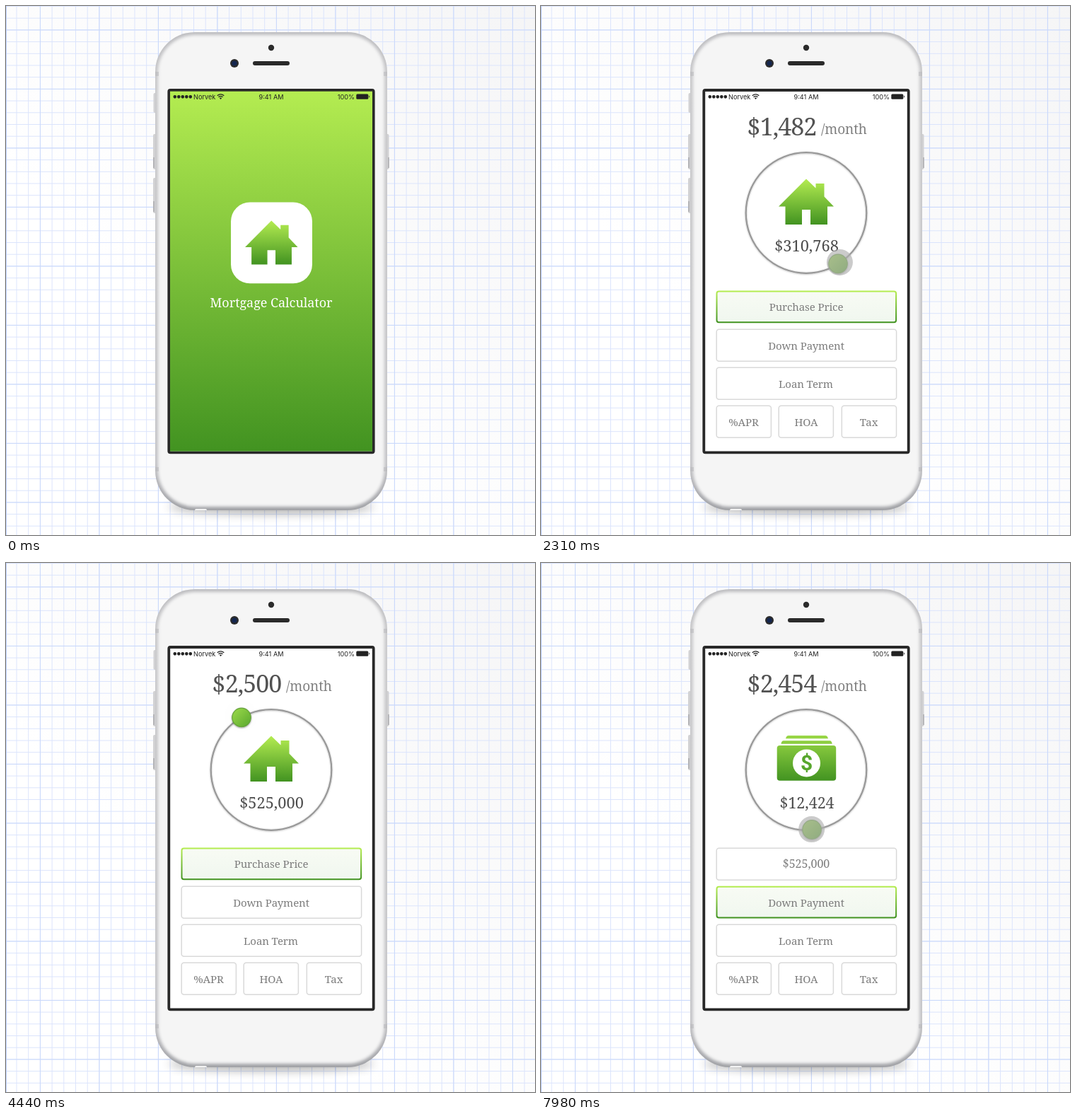
Animation, 748 px wide and 748 px high, one loop 8 s. Source, as an HTML page:

```html
<!DOCTYPE html>
<html lang="en">
<head>
<meta charset="utf-8">
<title>Mortgage Calculator</title>
<style>
  html, body { margin: 0; width: 100%; height: 100%; overflow: hidden; background: #fff; }
  svg { display: block; width: 100vw; height: 100vh; }
  .slab { font-family: "Noto Serif", serif; font-weight: 300; }
  .mid { text-anchor: middle; }
  .label { font-size: 15px; letter-spacing: -.1px; fill: #7c7c7c; }
  .price { font-size: 16px; letter-spacing: 0; }
  .status { font: 9.2px Inter, Roboto, sans-serif; fill: #222; }
  .box { fill: #fff; stroke: #d9d9d9; stroke-width: 1.5; }
  .active { fill: url(#tint); stroke: url(#green); stroke-width: 2; }
</style>
</head>
<body>
<svg viewBox="0 0 748 748" xmlns="http://www.w3.org/2000/svg">
  <defs>
    <linearGradient id="green" x2="0" y2="1">
      <stop stop-color="#b4ec51"/><stop offset="1" stop-color="#429321"/>
    </linearGradient>
    <linearGradient id="cash" gradientUnits="userSpaceOnUse" x1="0" y1="238" x2="0" y2="308">
      <stop stop-color="#a2de49"/><stop offset="1" stop-color="#429321"/>
    </linearGradient>
    <linearGradient id="tint" x2="0" y2="1">
      <stop stop-color="#f8fbf4"/><stop offset="1" stop-color="#f0f7ef"/>
    </linearGradient>
    <linearGradient id="ball" x2="1" y2="1">
      <stop stop-color="#9cdb47"/><stop offset="1" stop-color="#56a72b"/>
    </linearGradient>
    <linearGradient id="paper" x1="0" y1="1" x2="1" y2="0">
      <stop offset=".35" stop-color="#fff"/><stop offset="1" stop-color="#f5f5f6"/>
    </linearGradient>
    <linearGradient id="metal" x2="0" y2="1">
      <stop stop-color="#bcbcbf"/><stop offset=".1" stop-color="#c8c8ca"/>
      <stop offset=".9" stop-color="#c3c3c6"/><stop offset="1" stop-color="#9fa0a4"/>
    </linearGradient>
    <pattern id="minor" width="16.7" height="16.7" x="14.5" patternUnits="userSpaceOnUse">
      <path d="M.5 0V16.7M0 .5H16.7" stroke="#dbe4fc"/>
    </pattern>
    <pattern id="major" width="83.5" height="83.5" x="47.9" y="33.4" patternUnits="userSpaceOnUse">
      <path d="M.5 0V83.5M0 .5H83.5" stroke="#c9d8fb"/>
    </pattern>
    <filter id="soft" x="-10%" y="-10%" width="120%" height="120%"><feGaussianBlur stdDeviation="2"/></filter>
    <filter id="blur" x="-20%" y="-200%" width="140%" height="500%"><feGaussianBlur stdDeviation="7"/></filter>
    <filter id="drop" x="-30%" y="-30%" width="160%" height="160%">
      <feDropShadow dx="0" dy="1" stdDeviation="1.3" flood-opacity=".42"/>
    </filter>
    <filter id="halo" x="-5%" y="-5%" width="110%" height="110%">
      <feDropShadow dx="0" dy=".5" stdDeviation=".9" flood-opacity=".3"/>
    </filter>
    <clipPath id="body"><rect x="211" y="37" width="328" height="676" rx="56"/></clipPath>
    <path id="house" d="M375 244.5L388.5 257.5V251H400.5V269.5L414 283.5H405V309H381V288H369V309H345.5V283.5H336Z" fill="url(#green)"/>
  </defs>

  <!-- backdrop -->
  <rect width="748" height="748" fill="url(#paper)"/>
  <rect width="748" height="748" fill="url(#minor)"/>
  <rect width="748" height="748" fill="url(#major)"/>
  <path d="M.5 0V748" stroke="#bccffa"/>

  <!-- phone -->
  <ellipse cx="375" cy="708" rx="145" ry="10" opacity=".3" filter="url(#blur)"/>
  <g fill="#d2d2d4">
    <rect x="208.5" y="123" width="5" height="28" rx="2"/>
    <rect x="208" y="181" width="5" height="50" rx="2"/>
    <rect x="208" y="243" width="5" height="50" rx="2"/>
    <rect x="537" y="181" width="4.5" height="50" rx="2"/>
  </g>
  <path d="M209 214V229M209 276V291M541 214V229" stroke="#a0a0a3" stroke-width="1.2"/>
  <g clip-path="url(#body)">
    <rect x="211" y="37" width="328" height="676" fill="url(#metal)"/>
    <rect x="215" y="41" width="320" height="667" rx="52" fill="#f5f5f5" filter="url(#soft)"/>
    <path d="M211 96H216M534 96H539M211 655H216M534 655H539" stroke="#b9b9bc" stroke-width="6" opacity=".55"/>
    <rect x="267" y="711" width="17" height="4" rx="2" fill="#f3f3f3"/>
  </g>
  <circle cx="375" cy="59" r="4.2" fill="#2b2b2b"/>
  <circle cx="323" cy="81" r="6" fill="#2b2b2b"/>
  <circle cx="323" cy="81" r="3.6" fill="#14264f"/>
  <rect x="349" y="78" width="52" height="6" rx="3" fill="#2a2a2a"/>
  <rect x="230.3" y="119" width="289.4" height="512.3" rx="2" fill="#fff" stroke="#282828" stroke-width="3.8"/>

  <!-- calculator -->
  <g id="ui" class="slab">
    <text id="monthly" class="mid" x="340.5" y="183" font-size="34" letter-spacing="-.95" fill="#525252"></text>
    <text x="396" y="181" font-size="19" letter-spacing="-.1" fill="#808080">/month</text>

    <circle cx="375" cy="292.5" r="85.3" fill="none" stroke="#989898" stroke-width="2.2" filter="url(#halo)"/>

    <g id="homeView">
      <use href="#house"/>
      <text id="price" class="mid" x="375.5" y="347" font-size="21.8" fill="#4c4c4c"></text>
      <rect class="active" x="248.5" y="403.4" width="253.6" height="43.8" rx="3"/>
      <text class="mid label" x="375" y="430.5">Purchase Price</text>
      <rect class="box" x="248.2" y="457.2" width="254.4" height="45" rx="3.5"/>
    </g>

    <g id="cashView">
      <path fill="url(#cash)" d="M346 248.3Q347 244 350 244H402Q405 244 406 248.3ZM339.5 255.8Q340 251.2 343 251.2H408.5Q411 251.2 411.7 255.8Z"/>
      <rect x="333.7" y="258" width="83.5" height="49.7" rx="4" fill="url(#cash)"/>
      <circle cx="375.5" cy="283" r="19.5" fill="#fff"/>
      <text class="mid" x="375.5" y="293.3" font-size="30" fill="#57a62c" style="font-family:Roboto,sans-serif;font-weight:700">$</text>
      <rect class="box" x="248.2" y="403.2" width="254.4" height="45" rx="3.5"/>
      <text class="mid label price" x="375" y="431.3">$525,000</text>
      <rect class="active" x="248.5" y="457.7" width="253.6" height="43.8" rx="3"/>
    </g>
    <text id="down" class="mid" x="376" y="347" font-size="21.4" fill="#4c4c4c"></text>

    <g class="mid label">
      <rect class="box" x="248.2" y="511.3" width="254.4" height="45" rx="3.5"/>
      <rect class="box" x="248.2" y="565.3" width="77.2" height="45" rx="3.5"/>
      <rect class="box" x="336.2" y="565.3" width="77.2" height="45" rx="3.5"/>
      <rect class="box" x="425.3" y="565.3" width="77.2" height="45" rx="3.5"/>
      <text x="375" y="485.5">Down Payment</text>
      <text x="374.5" y="540">Loan Term</text>
      <text x="286.5" y="594.3">%APR</text>
      <text x="375" y="594.3">HOA</text>
      <text x="463.5" y="594.3">Tax</text>
    </g>

    <circle id="knob" r="13.2" fill="url(#ball)" stroke="#62a136" stroke-width="1.2" filter="url(#drop)"/>
    <circle id="touch" fill="#afafaf"/>
  </g>

  <!-- splash -->
  <g id="splash">
    <rect x="232" y="120.7" width="286" height="508.9" fill="url(#green)"/>
    <rect x="318" y="277.5" width="115" height="114.8" rx="27" fill="#fff"/>
    <use href="#house" transform="translate(375.3 303.5) scale(.955 .96) translate(-375 -244.5)"/>
    <text class="slab mid" x="375" y="426.3" font-size="18" letter-spacing="-.05" fill="#fff" style="font-weight:400">Mortgage Calculator</text>
  </g>

  <!-- status bar -->
  <g class="status">
    <path d="M238.8 128.3H262" stroke="#222" stroke-width="4.7" stroke-linecap="round" stroke-dasharray="0 5.5"/>
    <text x="265" y="132">Norvek</text>
    <path d="M298.7 126.8Q303.5 122.8 308.3 126.8M300.5 128.8Q303.5 126.3 306.5 128.8" fill="none" stroke="#222" stroke-width="1.3"/>
    <path d="M301.9 130.2Q303.5 129 305.1 130.2L303.5 132Z"/>
    <text class="mid" x="375" y="132">9:41 AM</text>
    <text x="493" y="132" text-anchor="end">100%</text>
    <rect x="495.3" y="124.5" width="17" height="7.3" rx="1.5"/>
    <path d="M513.2 126.5Q515.2 128 513.2 129.8Z"/>
  </g>
</svg>

<script>
const LOOP = 8000;
const $ = id => document.getElementById(id);
const [ui, splash, homeView, cashView, monthly, price, down, knob, touch] =
  ['ui', 'splash', 'homeView', 'cashView', 'monthly', 'price', 'down', 'knob', 'touch'].map($);

const ramp = (t, a, b) => Math.min(1, Math.max(0, (t - a) / (b - a)));
const inOut = p => p < .5 ? 2 * p * p : 1 - 2 * (1 - p) ** 2;
const out = p => 1 - (1 - p) ** 2;
const tween = (t, a, b) => inOut(ramp(t, a, b));
const money = v => '$' + Math.round(v).toLocaleString('en-US');

// Degrees run counter-clockwise from the bottom of the ring.
function place(el, deg, cx, cy, r) {
  const a = deg * Math.PI / 180;
  el.setAttribute('cx', cx + r * Math.sin(a));
  el.setAttribute('cy', cy + r * Math.cos(a));
}

// Finger press: shrinks while appearing, grows while leaving.
function press(t, inA, inB, outA, outB) {
  const p = ramp(t, inA, inB), q = ramp(t, outA, outB);
  touch.setAttribute('r', 22.5 - 4 * out(p) + 4.5 * out(q));
  touch.setAttribute('opacity', .65 * p * (1 - q));
}

const STOP = 569.6;                       // one turn and a half, upper left
const slide = (t, from, size) => size * ramp(t, from, from + 2000) ** 2;

function draw(t) {
  splash.setAttribute('opacity', 1 - ramp(t, 450, 740));
  ui.setAttribute('opacity', out(ramp(t, 840, 1330)));

  const swap = ramp(t, 5860, 6080);
  homeView.setAttribute('opacity', 1 - swap);
  cashView.setAttribute('opacity', swap);
  down.setAttribute('opacity', ramp(t, 6240, 6600));

  price.textContent = money(300000 + 225000 * tween(t, 2001, 4005));
  down.textContent = money(slide(t, 7611, 363000));
  monthly.textContent = money(1400 + 1100 * tween(t, 1905, 4005) - slide(t, 7513, 844));

  const back = (STOP - 360) * (1 - tween(t, 5850, 6450));
  const angle = t < 5000 ? STOP * tween(t, 1967, 4020) : back + slide(t, 7577, 133);
  place(knob, angle, 375, 292.3, 85);

  if (t < 5000) {
    place(touch, STOP * tween(t, 1955, 4020), 374.5, 291, 86);
    press(t, 1580, 1900, 4150, 4450);
  } else if (t < 6800) {
    place(touch, 0, 377, 480, 0);
    press(t, 5440, 5640, 5940, 6270);
  } else {
    place(touch, slide(t, 7577, 133), 374.5, 291, 86);
    press(t, 7180, 7500, LOOP, LOOP + 1);
  }
}

const start = performance.now();
function tick() {
  draw((performance.now() - start) % LOOP);
  requestAnimationFrame(tick);
}
tick();
</script>
</body>
</html>
```
